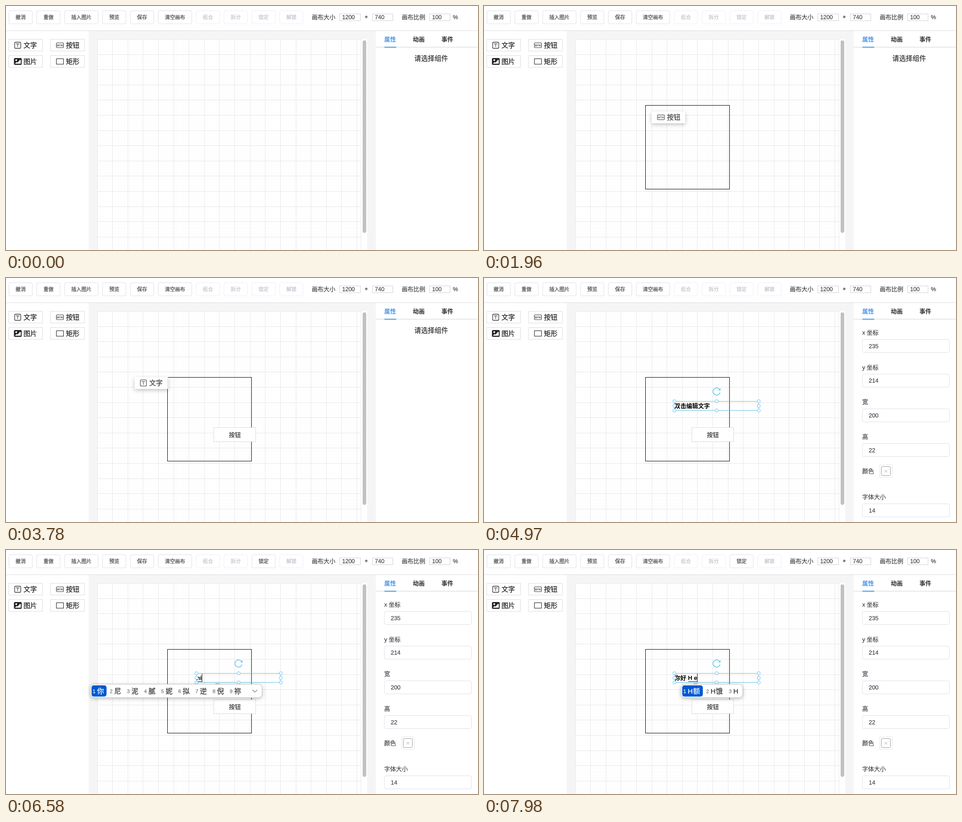
An HTML page that plays this animation: 1039x539 px, repeating every 8000 ms.

```html
<!DOCTYPE html>
<html lang="zh-CN">
<head>
<meta charset="utf-8">
<title>画布编辑器</title>
<style>
  html, body { margin: 0; width: 100%; height: 100%; overflow: hidden; background: #fff; }
  svg { display: block; width: 1039px; height: 539px; }
  text { font-family: "Liberation Sans", "Noto Sans CJK SC", "Noto Sans CJK", sans-serif; white-space: pre; stroke-width: .25px; }
  text[font-weight] { stroke: none; }
  .ghost { opacity: .85; filter: drop-shadow(0 3px 5px rgba(0, 0, 0, .28)); }
  #ime { filter: drop-shadow(0 2px 4px rgba(0, 0, 0, .25)); }
  #ime text { letter-spacing: .7px; }
</style>
</head>
<body>
<svg id="stage" viewBox="0 0 1039 539"></svg>
<script>
const LOOP = 8000, STEP = 70;
const INK = "#46484b", LINE = "#dcdfe6", BLUE = "#4497e8", SKY = "#62bfe6";

const rect = (x, y, w, h, fill, stroke = "none", rx = 0, more = "") =>
  `<rect x="${x}" y="${y}" width="${w}" height="${h}" rx="${rx}" fill="${fill}" stroke="${stroke}" ${more}/>`;
const path = (d, stroke, width = 1, fill = "none") =>
  `<path d="${d}" stroke="${stroke}" stroke-width="${width}" fill="${fill}"/>`;
// Text placed by the vertical centre of its glyphs
const text = (x, cy, str, size = 13, fill = INK, more = "") =>
  `<text x="${x}" y="${cy + size * .37}" font-size="${size}" fill="${fill}" stroke="${fill}" ${more}>${str}</text>`;
const group = (id, body, more = "") => `<g id="${id}" ${more}>${body}</g>`;
const MID = 'text-anchor="middle" ', BOLD = 'font-weight="700"';

function toolbar() {
  let x = 6.5, out = "";
  for (const name of "撤消 重做 插入图片 预览 保存 清空画布 组合 拆分 锁定 解锁".split(" ")) {
    const w = name.length * 11.14 + 29.2;
    const off = "组合拆分锁定解锁".includes(name);
    out += group(name === "锁定" ? "lock" : "",
      rect(x, 10.5, w, 29, "#fff", off ? "#ebeef5" : LINE, 3) +
      text(x + w / 2, 25, name, 11.14, off ? "#c0c4cc" : INK, MID));
    x += w + 9.8;
  }
  const field = (x, w, value) => rect(x, 17.5, w, 15, "#fff", "#d0d0d0") + text(x + 5.5, 24.5, value, 12.5);
  return out + text(673, 24.5, "画布大小") + field(734.5, 46, "1200") + text(789.8, 26.5, "*", 17) +
    field(806.5, 45, "740") + text(871, 24.5, "画布比例") + field(932.5, 45, "100") +
    text(983.5, 24.5, "%") + path("M0 54.5H1039", "#ddd");
}

// Icons are drawn relative to the top left of a palette item
const icons = {
  文字: rect(13.5, 7, 13.5, 13.5, "none", "#333", 2, 'stroke-width="1.3"') +
    path("M17 11.5V10.5H23.5V11.5M20.2 10.5V17.5", "#333", 1.1),
  按钮: rect(13.5, 8.5, 15.5, 10.5, "none", "#333", 1.5, 'stroke-width="1.2"') +
    text(21.2, 13.8, "BTN", 6, "#333", MID + BOLD),
  图片: rect(12, 6, 17, 15, "#222", "none", 2) +
    `<circle cx="17" cy="10.5" r="1.9" fill="#fff"/>` +
    path("M14 18.5L18 14.5L20 16L25.5 9.5L27 11V18.5Z", "none", 0, "#fff"),
  矩形: rect(13.5, 7.5, 15.5, 12, "none", "#333", 0, 'stroke-width="1.2"')
};
const itemBody = name => icons[name] + text(name === "文字" || name === "图片" ? 33 : 34.5, 13.8, name, 14.86, "#222");
const item = (name, x, y) =>
  `<g transform="translate(${x} ${y})">${rect(.5, .5, 74.5, 26, "#fff", "#dcdcdc")}${itemBody(name)}</g>`;
const palette = () => item("文字", 5.5, 73) + item("按钮", 97.5, 73) + item("图片", 5.5, 109) + item("矩形", 97.5, 109);

function board() {
  const lines = gap => {
    let d = "";
    for (let i = 0; i * gap < 582; i++) {
      const s = i * gap;
      d += `M${Math.floor(201 + s) + .5} 73V539`;
      if (s < 466) d += `M201 ${Math.floor(73.4 + s) + .5}H782`;
    }
    return d;
  };
  return rect(182, 55, 632, 484, "#f5f5f5") + rect(201, 73, 594, 466, "#fff") +
    path(lines(6.724), "#fcfcfc") + path(lines(33.62), "#e6e6e6") +
    path("M781.5 73V539", "#e8e8e8") + rect(785, 76, 8, 425, "#c1c1c1", "none", 4);
}

const tabs = () => text(832.5, 73.5, "属性", 13, BLUE, BOLD) + text(895.5, 73.5, "动画", 13, "#303133", BOLD) +
  text(958.5, 73.5, "事件", 13, "#303133", BOLD) + rect(814, 90, 225, 2, "#e4e7ed") + rect(833, 90, 26, 2, BLUE);

function form() {
  const row = (cy, label, value) => text(832.5, cy, label) +
    rect(833, cy + 15.5, 191.5, 29, "#fff", LINE, 4) + text(847, cy + 30, value, 12.9);
  return row(120, "x 坐标", 235) + row(196.7, "y 坐标", 214) + row(273.4, "宽", 200) + row(350.1, "高", 22) +
    text(832.5, 426.5, "颜色") + rect(870.5, 412.5, 28.5, 28.5, "#fff", "#e6e6e6", 4) +
    rect(874.5, 416.5, 20, 20, "#fff", "#999", 2) + path("M882 424L887.5 429.5M887.5 424L882 429.5", "#aaa") +
    row(483.3, "字体大小", 14);
}

function selection() {
  let out = rect(419.5, 272.5, 185, 20, "none", SKY);
  for (const x of [419.2, 512, 604.8])
    for (const y of [272.3, 282.5, 292.7])
      if (x !== 512 || y !== 282.5) out += `<circle cx="${x}" cy="${y}" r="3.5" fill="#fff" stroke="${SKY}"/>`;
  return out + path("M517.8 245.3A8 8 0 1 0 519.6 253.3", SKY, 1.5) + path("M520.5 243.3V248.2H515.6Z", "none", 0, SKY);
}

const ghost = (id, name) => group(id, rect(0, 0, 74, 26, "#fff") +
  `<g transform="translate(-.8 -.8)">${itemBody(name)}</g>`, 'class="ghost"');

document.getElementById("stage").innerHTML =
  rect(0, 0, 1039, 539, "#fff") + board() + toolbar() + palette() + tabs() +
  group("hint", text(936, 115.5, "请选择组件", 14.86, "#303133", MID)) + group("form", form()) +
  group("box", rect(355.5, 219.5, 185, 185, "none", "#000")) +
  group("btn", rect(457.5, 330.5, 92, 31, "#fff", "#dcdcdc") + text(503.7, 345.7, "按钮", 13, "#505255", MID + BOLD)) +
  group("mark", rect(419, 274, 78.5, 17, "#b3d7ff")) +
  text(419.3, 282.2, "", 13, "#000", BOLD + ' id="words"') +
  group("caret", path("M.5 273.5V291.5", "#000")) + `<path id="under" stroke="#222"/>` +
  group("sel", selection()) + group("ime", "") +
  ghost("dragBox", "矩形") + ghost("dragBtn", "按钮") + ghost("dragText", "文字");

const $ = id => document.getElementById(id);
const show = (id, on) => $(id).setAttribute("visibility", on ? "visible" : "hidden");

// Drag paths: [time, x, y]; the part is dropped at the given end time
const drags = [
  ["dragBox", 910, [[420, 149, 124], [560, 230, 170], [700, 292, 196], [840, 315, 205]]],
  ["dragBtn", 2590, [[1820, 157, 100], [1890, 272, 172], [1960, 369, 233], [2100, 402, 270], [2310, 415, 305], [2520, 419, 317]]],
  ["dragText", 4130, [[3570, 93, 108], [3640, 160, 150], [3780, 283, 219], [3920, 350, 246], [4060, 379, 258]]]
];

function drag([id, end, pts], t) {
  const on = t >= pts[0][0] && t < end;
  show(id, on);
  if (!on) return;
  let i = 1;
  while (i < pts.length - 1 && t > pts[i][0]) i++;
  const [a, b] = [pts[i - 1], pts[i]];
  const p = Math.min(1, (t - a[0]) / (b[0] - a[0]));
  $(id).setAttribute("transform", `translate(${a[1] + (b[1] - a[1]) * p} ${a[2] + (b[2] - a[2]) * p})`);
}

// Typing: [time, committed text, composing text, candidates]
const typing = [
  [0, "", ""],
  [4130, "双击编辑文字", ""],
  [6300, "", "n", "你 那 年 能 呢 拿 哪 女 您"],
  [6580, "", "ni", "你 尼 泥 腻 妮 拟 逆 倪 祢"],
  [6790, "", "ni h", "你好 你会 你还 你 尼 泥 腻 妮"],
  [6930, "", "ni ha", "你好 你还 你 尼 泥 腻 妮"],
  [7000, "", "ni hao", "你好 拟好 你 尼 泥 腻 妮"],
  [7280, "你好 ", ""],
  [7700, "你好 ", "H", "H"],
  [7910, "你好 ", "H e", "H额 H饿 H"]
];

function candidates(list) {
  const wide = list.length > 3, left = wide ? 186 : 434;
  let x = left + 2.3, cells = "";
  list.forEach((word, i) => {
    const w = [...word].reduce((sum, c) => sum + (c === "H" ? 12.4 : 15), 18);
    if (!i) cells += rect(x, 299, w, 24.7, "#0058d0", "none", 5);
    cells += text(x + 2.5, 311.5, i + 1, 11, i ? "#777" : "#fff") + text(x + 12.3, 311, word, 15.2, i ? "#333" : "#fff");
    x += w + 4.7;
  });
  const right = wide ? 563.5 : x - 2;
  return rect(left, 296.5, right - left, 29.5, "#fff", "#c8c8c8", 8) + path("M461 295.5H470", "#999", 1.5) + cells +
    (wide ? path("M542.5 309L547.7 314L553 309", "#777", 1.2) : "");
}

let current = null;
function setTyping(state) {
  if (state === current) return;
  current = state;
  const [, done, draft, list] = state, words = $("words");
  words.textContent = done + draft;
  const length = n => n ? words.getSubStringLength(0, n) : 0;
  const start = 419.3 + length(done.length), end = 419.3 + length((done + draft).length);
  $("caret").setAttribute("transform", `translate(${Math.round(end - .3)} 0)`);
  $("under").setAttribute("d", draft ? `M${start + .7} 290.5H${end}` : "");
  $("ime").innerHTML = list ? candidates(list.split(" ")) : "";
}

function setLock(on) {
  const [frame, label] = $("lock").children;
  const ink = on ? INK : "#c0c4cc";
  frame.setAttribute("stroke", on ? LINE : "#ebeef5");
  label.setAttribute("fill", ink);
  label.setAttribute("stroke", ink);
}

function draw(time) {
  const t = Math.floor((time % LOOP) / STEP) * STEP;
  for (const d of drags) drag(d, t);
  show("box", t >= 910);
  show("btn", t >= 2590);
  show("hint", t < 4970);
  show("form", t >= 4970);
  show("sel", t >= 4970);
  show("mark", t >= 5250 && t < 6300);
  show("caret", t >= 6300);
  setLock(t >= 5040);
  setTyping(typing.filter(s => s[0] <= t).pop());
}

const origin = performance.now();
function tick() {
  draw(performance.now() - origin);
  requestAnimationFrame(tick);
}
tick();
</script>
</body>
</html>
```
